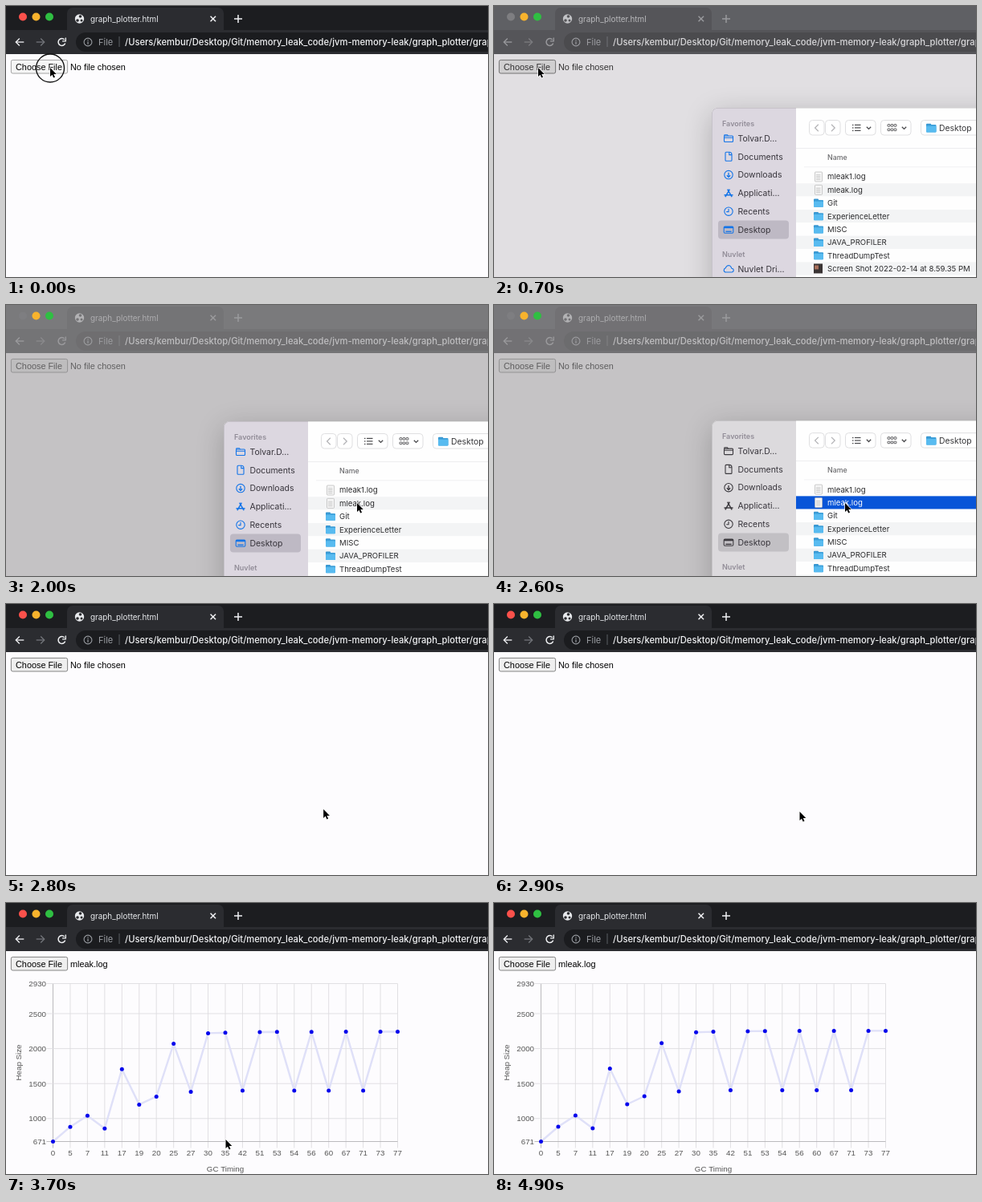
An HTML page with a canvas for the animation above (5 s loop, 600x338 px).

```html
<!DOCTYPE html>
<html lang="en">
<head>
<meta charset="utf-8">
<title>graph_plotter</title>
<style>
html, body { margin: 0; width: 100%; height: 100%; overflow: hidden; background: #fdfcfe; }
canvas { display: block; width: 600px; height: 338px; }
</style>
</head>
<body>
<canvas id="stage"></canvas>
<script>
const W = 600, H = 338, LOOP = 5000, STEP = 100;
const UI = 'Inter, Roboto, sans-serif';
const ARIAL = '"Liberation Sans", Arial, sans-serif';
const LEFT = Math.PI, DOWN = Math.PI / 2;
const canvas = document.getElementById('stage');
const dpr = window.devicePixelRatio || 1;
canvas.width = W * dpr;
canvas.height = H * dpr;
const c = canvas.getContext('2d');

const clamp = v => Math.max(0, Math.min(1, v));
const smooth = v => v * v * (3 - 2 * v);
const range = (n, fn) => Array.from({ length: n }, (_, i) => fn(i));

function at(x, y, angle, paint) {
  c.save();
  c.translate(x, y);
  c.rotate(angle);
  paint();
  c.restore();
}

function rect(x, y, w, h, color) {
  c.fillStyle = color;
  c.fillRect(x, y, w, h);
}

function round(x, y, w, h, r, fill, stroke, lw = 1) {
  c.beginPath();
  c.roundRect(x, y, w, h, r);
  if (fill) { c.fillStyle = fill; c.fill(); }
  if (stroke) { c.strokeStyle = stroke; c.lineWidth = lw; c.stroke(); }
}

function disc(x, y, r, fill) {
  c.beginPath();
  c.arc(x, y, r, 0, Math.PI * 2);
  c.fillStyle = fill;
  c.fill();
}

function ring(x, y, r, color, lw = 1, from = 0, to = Math.PI * 2) {
  c.beginPath();
  c.arc(x, y, r, from, to);
  c.strokeStyle = color;
  c.lineWidth = lw;
  c.stroke();
}

// p is a flat list x, y, x, y...
function line(color, lw, ...p) {
  c.beginPath();
  for (let i = 0; i < p.length; i += 2) c.lineTo(p[i], p[i + 1]);
  c.strokeStyle = color;
  c.lineWidth = lw;
  c.stroke();
}

// Arrow head with its tip at x, y and an optional shaft
function arrow(color, x, y, angle, size, shaft = 0) {
  at(x, y, angle, () => {
    line(color, 1.3, -size, -size, 0, 0, -size, size);
    if (shaft) line(color, 1.3, -shaft, 0, 0, 0);
  });
}

function cross(color, x, y, r, angle) {
  at(x, y, angle, () => {
    line(color, 1.5, -r, 0, r, 0);
    line(color, 1.5, 0, -r, 0, r);
  });
}

// y is the middle of the capital letters
function text(s, x, y, size, color, { font = UI, weight = 400, align = 'left' } = {}) {
  c.font = `${weight} ${size}px ${font}`;
  c.textAlign = align;
  c.textBaseline = 'alphabetic';
  c.fillStyle = color;
  c.fillText(s, x, y + size * 0.36);
}

function header(inactive) {
  const bar = inactive ? '#35363a' : '#2b2c30';
  const icon = inactive ? '#96989c' : '#f1f2f4';
  const faint = inactive ? '#6c6e72' : '#73757a';
  const grey = '#9a9da2';
  rect(0, 0, W, 30, inactive ? '#43464a' : '#1c1d20');
  round(76, 2, 195, 34, [7, 7, 0, 0], bar);
  rect(0, 30, W, 30, bar);
  round(87, 33, 540, 24, 12, inactive ? '#27282b' : '#1b1c1f');

  disc(91.5, 16, 5.7, inactive ? '#d0d2d5' : '#e8eaed');
  disc(89, 18, 1.8, bar);
  disc(92.5, 13, 1.8, bar);
  disc(94, 18, 1.5, bar);
  text('graph_plotter.html', 105, 16, 9.9, inactive ? '#c4c6c9' : '#e8eaed');
  cross(icon, 257.8, 16, 4.6, Math.PI / 4);
  cross(icon, 289, 16, 5, 0);

  arrow(icon, 12.3, 45, LEFT, 4.5, 10);
  arrow(faint, 47.7, 45, 0, 4.5, 10);
  ring(69.5, 45, 4.4, icon, 1.5, 0.35, 5.5);
  arrow(icon, 74.3, 43.8, Math.PI / 4, 3);

  ring(102, 45, 4.9, grey, 1.1);
  rect(101.4, 44.3, 1.2, 3.5, grey);
  rect(101.4, 42.1, 1.2, 1.2, grey);
  text('File', 115, 45, 11, grey);
  rect(140.5, 38, 1, 13, '#5d5f64');
  text('/Users/kembur/Desktop/Git/memory_leak_code/jvm-memory-leak/graph_plotter/graph_plotter.html',
    148, 45, 11.2, '#f1f2f4', { weight: 500 });
}

function lights(inactive) {
  const colors = [inactive ? '#7e7e81' : '#fb514b', '#f8b32d', '#2fbf42'];
  colors.forEach((col, i) => disc(21 + i * 16.5, 13.5, 5, col));
}

function picker(t) {
  let fill = '#efefef', edge = '#767676';
  if (t < 200) { fill = '#f5f5f5'; edge = '#9a9a9a'; }
  else if (t < 800) { fill = '#e5e5e5'; edge = '#4f4f4f'; }
  round(6.4, 67.4, 70.2, 16.6, 2, fill, edge, 0.9);
  text('Choose File', 12, 75.6, 10.87, '#000', { font: ARIAL });
  text(t < 3050 ? 'No file chosen' : 'mleak.log', 80, 75.6, 10.87, '#000', { font: ARIAL });
}

// Heap climbs unevenly, then swings between a ceiling and a floor
const LABELS = '0 5 7 11 17 19 20 25 27 30 35 42 51 53 54 56 60 67 71 73 77'.split(' ');
const CLIMB = [671, 883, 1043, 860, 1714, 1204, 1319, 2080, 1388];
const SWING = '^^v^^v^v^v^^';
const heap = i => {
  const k = i - CLIMB.length;
  if (k < 0) return CLIMB[i];
  return SWING[k] === 'v' ? 1406 : 2255 - 22 * 0.65 ** k;
};
const MIN = 671, MAX = 2930;
const chartX = i => 58.5 + i * 21.45;
const chartY = v => 297.5 - (v - MIN) * 197 / (MAX - MIN);

function chart(t) {
  const grow = 1 - (1 - clamp((t - 3000) / 1000)) ** 4;
  const ink = '#555', mid = { font: ARIAL, align: 'center' };
  const grid = first => first ? '#b4b3b6' : '#dedde0';
  LABELS.forEach((s, i) => {
    line(grid(i === 0), 0.9, chartX(i), 100.5, chartX(i), 305.5);
    text(s, chartX(i), 311.4, 9.78, ink, mid);
  });
  [MIN, ...range(4, i => 1000 + i * 500), MAX].forEach(v => {
    line(grid(v === MIN), 0.9, 50.5, chartY(v), 487.5, chartY(v));
    text(String(v), 50, chartY(v), 9.78, ink, { font: ARIAL, align: 'right' });
  });
  text('GC Timing', 273, 331, 9.78, ink, mid);
  at(15, 199, -DOWN, () => text('Heap Size', 0, 0, 9.78, ink, mid));

  const pts = LABELS.map((_, i) => [chartX(i), chartY(MIN + (heap(i) - MIN) * grow)]);
  line('#dfe0f8', 2.4, ...pts.flat());
  pts.forEach(([x, y]) => disc(x, y, 2.5, '#0505ec'));
}

function folder(x, y, w = 12) {
  const h = w * 0.86, top = y - h / 2;
  round(x, top, w * 0.5, h * 0.5, 1, '#3594cf');
  round(x, top + h * 0.13, w, h * 0.87, 1, '#3d9fd9');
  round(x, top + h * 0.3, w, h * 0.7, 1, '#58bbf0');
}

function page(x, y) {
  round(x + 1.5, y - 6, 9, 12, 0.8, '#f6f6f6', '#b5b5b5', 0.7);
  range(4, i => rect(x + 3, y - 2.6 + i * 1.9, 5.5, 0.7, '#b9b9b9'));
}

function thumb(x, y) {
  rect(x, y - 6, 11, 12, '#3a3434');
  rect(x + 1, y - 4, 5, 5, '#a8705c');
}

// Each icon is drawn around 0, 0
const ICONS = {
  folder(col) {
    round(-5.5, -3, 11, 7.5, 1, null, col, 1.1);
    line(col, 1.1, -5.5, -3, -5, -4.3, -1.5, -4.3, -0.5, -3);
    line(col, 1.1, -5.5, -0.8, 5.5, -0.8);
  },
  doc(col) {
    round(-4, -5.5, 8, 11, [1, 3, 1, 1], null, col, 1.1);
    line(col, 1.1, 0.8, -5.5, 0.8, -2.2, 4, -2.2);
  },
  down(col) {
    ring(0, 0, 5.2, col, 1.1);
    arrow(col, 0, 2.8, DOWN, 2.2, 5.6);
  },
  apps(col) {
    range(3, i => at(0, 0.8, i * Math.PI * 2 / 3, () => line(col, 1.5, -5.5, 1.6, 5.5, 1.6)));
  },
  clock(col) {
    ring(0, 0, 5.2, col, 1.1);
    line(col, 1.1, 0, -3.2, 0, 0.4, -2.8, 0.4);
  },
  desk(col) {
    round(-5.8, -4, 11.6, 8.2, 1.2, null, col, 1.1);
    rect(-5.8, -4, 11.6, 2.2, col);
    rect(-3.6, 1.6, 7.2, 1.3, col);
  },
  cloud(col) {
    c.beginPath();
    c.arc(-3.2, 1.4, 2.6, DOWN, Math.PI * 1.4);
    c.arc(0, -1, 3.4, Math.PI * 1.1, Math.PI * 1.85);
    c.arc(3.8, 1.6, 2.4, -DOWN, DOWN);
    c.closePath();
    c.strokeStyle = col;
    c.lineWidth = 1.1;
    c.stroke();
  }
};

const PLACES = [['folder', 'Tolvar.D...'], ['doc', 'Documents'], ['down', 'Downloads'],
  ['apps', 'Applicati...'], ['clock', 'Recents'], ['desk', 'Desktop']];
const FILES = [['mleak1.log', page], ['mleak.log', page], ['Git', folder], ['ExperienceLetter', folder],
  ['MISC', folder], ['JAVA_PROFILER', folder], ['ThreadDumpTest', folder],
  ['Screen Shot 2022-02-14 at 8.59.35 PM', thumb]];

function place(kind, name, y, col) {
  at(292, y, 0, () => ICONS[kind](col));
  text(name, 303.5, y, 10.45, '#37343b');
}

function sidebar(inactive) {
  const tint = inactive ? '#3c3a3f' : '#1374e8';
  const head = { weight: 600 };
  rect(271, 145, 105, 300, inactive ? '#dcdadd' : '#dcd7e0');
  text('Favorites', 284, 164.3, 9, '#918c97', head);
  round(279, 285.5, 88, 23, 4, inactive ? '#c2c0c4' : '#beb9c4');
  PLACES.forEach(([kind, name], i) => place(kind, name, 183 + i * 22.8, tint));
  text('Nuvlet', 284, 328, 9, '#918c97', head);
  place('cloud', 'Nuvlet Dri...', 346, tint);
}

function toolButton(x, w) {
  round(x + 0.5, 160.5, w, 18.5, 4, '#fff', '#dcdcde', 0.9);
}

function toolbar() {
  const dark = '#4a4a4d', off = '#b5b5b8';
  toolButton(392, 18.5);
  toolButton(412, 18.5);
  arrow(off, 399.6, 170, LEFT, 4.2);
  arrow(off, 424.2, 170, 0, 4.2);
  toolButton(437, 37.5);
  toolButton(481, 37.5);
  toolButton(531, 90);
  range(3, i => {
    const y = 165.8 + i * 3.5;
    rect(446, y, 1.5, 1.3, dark);
    rect(449, y, 7.5, 1.2, dark);
    range(2, k => round(490 + i * 4, 165.6 + k * 5.4, 2.9, 2.6, 0.5, null, dark, 0.9));
  });
  arrow(dark, 466.5, 171.4, DOWN, 2.7);
  arrow(dark, 510.5, 171.4, DOWN, 2.7);
  folder(538, 170, 12.5);
  text('Desktop', 554, 170, 10.4, '#37373a');
}

function fileList(selected) {
  text('Name', 415, 207, 8.8, '#6a6a6d', { weight: 500 });
  FILES.forEach(([name, icon], i) => {
    const y = 231 + i * 16.35, on = selected && i === 1;
    const back = on ? '#0855d8' : i % 2 ? '#f3f4f5' : '#fefefe';
    rect(376, y - 8.1, 224, 16.3, back);
    icon(398, y);
    text(name, 415, y, 9.6, on ? '#fff' : '#2b2b2d');
  });
}

function dialog(p, t) {
  const closing = t >= 2600;
  c.save();
  c.globalAlpha = clamp(p * 2.2);
  c.translate(0, -36 * (1 - p));
  c.shadowColor = 'rgba(0,0,0,0.22)';
  c.shadowBlur = 34 * dpr;
  c.shadowOffsetY = 8 * dpr;
  round(271, 145, 400, 300, 8, '#fefefe');
  c.shadowColor = 'transparent';
  c.clip();
  sidebar(closing);
  toolbar();
  rect(376, 195, 224, 0.8, '#e9e9eb');
  rect(386, 218.5, 214, 0.7, '#ececee');
  fileList(t >= 2100);
  round(271, 145, 400, 300, 8, null, 'rgba(0,0,0,0.2)');
  c.restore();
}

// Each stop: time, x, y of the pointer tip
const PATH = [[700, 55, 77], [1200, 393, 172], [1900, 437, 247], [2600, 437, 247],
  [2900, 380.5, 259], [3400, 273.5, 295]];

function tip(t) {
  const n = PATH.findIndex(stop => stop[0] > t);
  const b = PATH[n < 0 ? PATH.length - 1 : n];
  const a = n > 0 ? PATH[n - 1] : b;
  const k = a === b ? 0 : smooth((t - a[0]) / (b[0] - a[0]));
  return [a[1] + (b[1] - a[1]) * k, a[2] + (b[2] - a[2]) * k];
}

function pointer(t) {
  at(...tip(t), 0, () => {
    const shape = new Path2D('M0 0V11L2.5 8.7L4.2 12.6L6 11.8L4.3 8H7.8Z');
    c.lineJoin = 'round';
    c.strokeStyle = '#fff';
    c.lineWidth = 1.5;
    c.stroke(shape);
    c.fillStyle = '#000';
    c.fill(shape);
  });
}

function draw(now) {
  const t = Math.floor((now % LOOP) / STEP) * STEP;
  const p = clamp((t - 600) / 200) * (1 - clamp((t - 2595) / 200));
  const open = p > 0;
  c.setTransform(dpr, 0, 0, dpr, 0, 0);
  rect(0, 0, W, H, '#fdfcfe');
  header(open);
  picker(t);
  if (t >= 3050) chart(t);
  if (open) rect(0, 0, W, H, `rgba(158,157,158,${0.6 * p})`);
  lights(open);
  if (open) dialog(p, t);
  if (t < 200) ring(55, 77.5, 17.5, '#111', 1.4);
  if (t < 4700) pointer(t);
}

let start = null;
function tick(now) {
  if (start === null) start = now;
  draw(now - start);
  requestAnimationFrame(tick);
}
draw(0);
requestAnimationFrame(tick);
</script>
</body>
</html>
```
